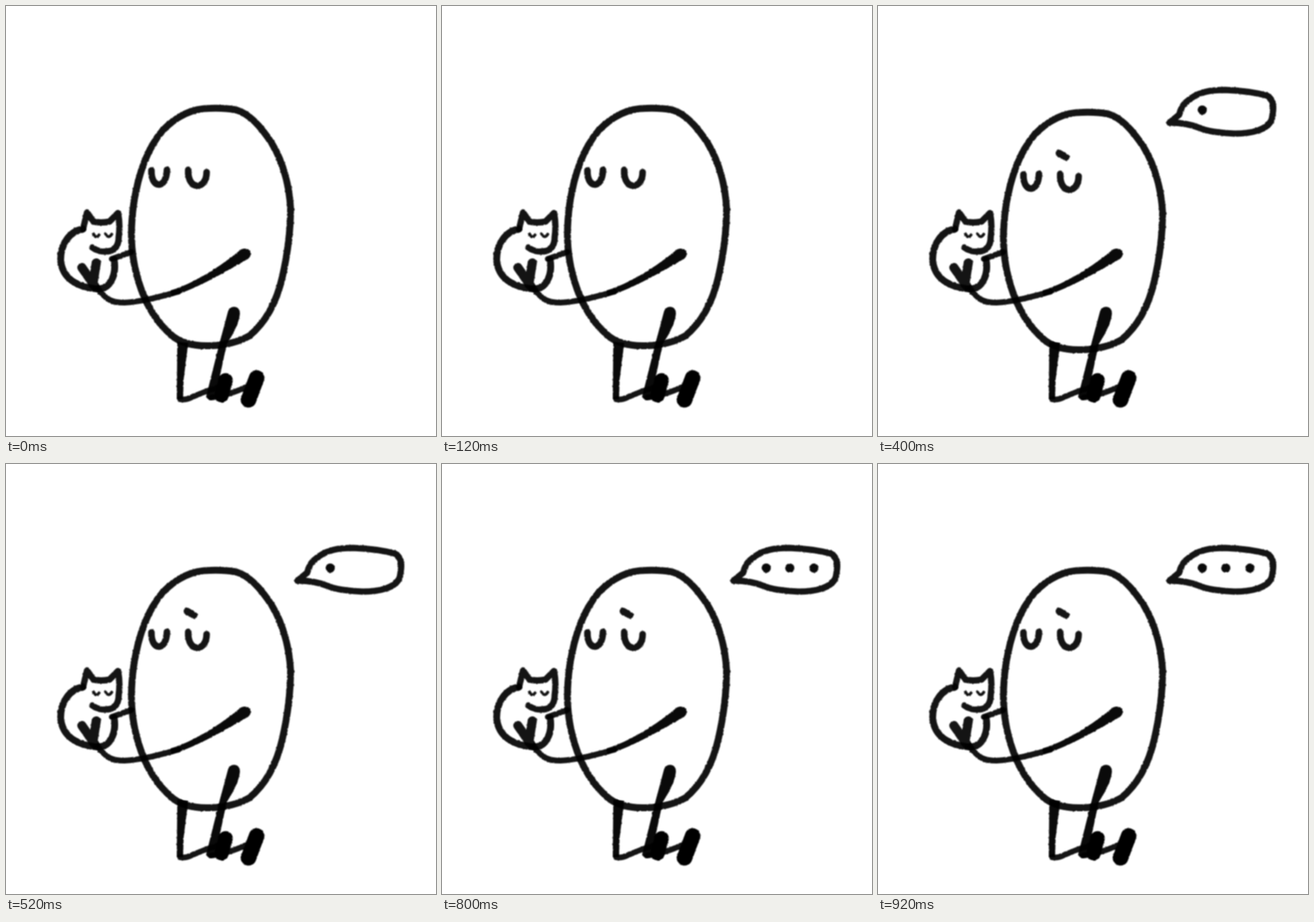
Recreate the animation shown at these times as an HTML page without scripts. Size 748 by 748 pixels, loop 1 s.

```html
<!DOCTYPE html>
<html lang="en">
<head>
<meta charset="utf-8">
<title>Sitting with a cat</title>
<style>
  html, body { margin: 0; width: 100%; height: 100%; overflow: hidden; background: #fff; }
  svg { display: block; width: 100%; height: 100%; }
  .ink { filter: url(#rough); fill: none; stroke: #000; stroke-opacity: .92; stroke-width: 12; stroke-linecap: round; stroke-linejoin: round; }
  .solid { fill: #000; fill-opacity: .96; stroke: none; }
  .foot { stroke-opacity: 1; }

  .body, .cat, .arm, .even, .odd, .talk, .dot1, .dot2, .dot3 { animation: 1s step-end infinite; }
  .body { animation-name: sink; }
  .cat  { animation-name: nudge; --dx: 4px; }
  .arm  { animation-name: nudge; --dx: 3px; }
  .odd  { animation-name: odd; }
  .even { animation-name: even; }
  .talk { animation-name: from1; }
  .dot1 { animation-name: from2; }
  .dot2 { animation-name: from3; }
  .dot3 { animation-name: from4; }

  @keyframes sink  { 0% { transform: none; } 20%, 100% { transform: translateY(7px); } }
  @keyframes nudge { 0%, 40%, 80%, 100% { transform: none; } 20%, 60% { transform: translate(var(--dx), 2px); } }
  @keyframes odd   { 0%, 40%, 80%, 100% { opacity: 0; } 20%, 60% { opacity: 1; } }
  @keyframes even  { 0%, 40%, 80%, 100% { opacity: 1; } 20%, 60% { opacity: 0; } }
  @keyframes from1 { 0% { opacity: 0; } 20%, 100% { opacity: 1; } }
  @keyframes from2 { 0% { opacity: 0; } 40%, 100% { opacity: 1; } }
  @keyframes from3 { 0% { opacity: 0; } 60%, 100% { opacity: 1; } }
  @keyframes from4 { 0% { opacity: 0; } 80%, 100% { opacity: 1; } }
</style>
</head>
<body>
<svg viewBox="0 0 748 748">
  <defs>
    <!-- crayon edge -->
    <filter id="rough" filterUnits="userSpaceOnUse" x="0" y="0" width="748" height="748" color-interpolation-filters="sRGB">
      <feTurbulence type="fractalNoise" baseFrequency=".25" numOctaves="2" seed="4" result="n"/>
      <feDisplacementMap in="SourceGraphic" in2="n" scale="2.500" xChannelSelector="R" yChannelSelector="G"/>
      <feGaussianBlur stdDeviation=".8"/>
    </filter>
  </defs>

  <g class="body"><g class="ink">
    <path d="M355 178C320 178 292 196 272 217C240 255 228 305 222 345C216 390 217 425 226 462C236 505 256 545 286 571C302 586 325 592 355 591C385 590 405 584 423 574C455 548 472 510 481 470C490 430 495 390 495 352C493 315 483 273 463 240C444 210 422 187 401 181Q380 177 355 178Z"/>
    <path stroke-width="11.500" d="M253 286C252 318 279 320 280 285M317 285C315 321 349 321 349 289"/>
  </g></g>

  <g class="even"><g class="ink">
    <path class="solid" d="M298 584L317 586L309 650L308 684L297 684Z"/>
    <path stroke-width="10" d="M303 684Q312 686 322 681L346 671L378 660M357 681Q385 678 420 662"/>
    <path class="solid" d="M386 532C389 520 407 520 407 535C405 555 391 577 384 588L364 682Q355 690 348 680L371 588Z"/>
    <path class="foot" stroke-width="25" d="M382 651L375 677"/>
    <path class="foot" stroke-width="27" d="M436 647L422 685"/>
  </g></g>

  <g class="odd"><g class="ink">
    <path class="solid" d="M295 586L314 588L305 650L304 688L292 687Z"/>
    <path stroke-width="10" d="M299 687Q308 691 320 684L346 673L378 662M355 684Q385 680 420 662"/>
    <path class="solid" d="M386 532C389 520 407 520 407 535C405 555 391 577 384 588L361 685Q352 693 345 683L371 588Z"/>
    <path class="foot" stroke-width="25" d="M381 653L373 681"/>
    <path class="foot" stroke-width="28" d="M438 646L424 683"/>
  </g></g>

  <g class="cat"><g class="ink">
    <path stroke-width="11" d="M134 388L141 359L152 375Q166 378 180 375L195 360Q199 382 196 402Q196 421 182 426Q163 430 150 420"/>
    <path stroke-width="12" d="M134 388C109 392 95 416 95 442C98 475 125 489 157 492C184 495 192 464 188 441"/>
    <path stroke-width="5" d="M152 396Q156 406 162 398M173 396Q178 406 184 397"/>
    <path stroke-width="16" d="M132 455L155 488M157 447L151 484"/>
    <path stroke-width="10" d="M184 440L218 428"/>
  </g></g>

  <g class="arm"><g class="ink">
    <path stroke-width="10" d="M160 492C176 513 186 516 206 516C240 514 270 505 300 497"/>
    <path class="solid" d="M285 495C325 484 375 452 408 424C422 417 432 431 421 440C385 460 335 491 288 505Z"/>
  </g></g>

  <g class="odd"><g class="ink">
    <path stroke-width="9" d="M508 275Q505 284 512 292Q506 304 517 312Q511 324 517 342M515 436Q505 446 515 455Q506 461 509 469"/>
  </g></g>

  <g class="talk"><g class="ink">
    <path d="M315 256L327 263"/>
    <path stroke-width="11" d="M507 203L524 189Q527 176 535 168C556 148 582 146 604 146C630 147 655 150 677 156C691 164 688 182 685 197C678 216 648 222 621 222C598 221 575 219 559 212C545 206 530 203 507 203Z"/>
    <circle class="solid dot1" cx="564" cy="181" r="8"/>
    <circle class="solid dot2" cx="605" cy="181" r="8"/>
    <circle class="solid dot3" cx="647" cy="181" r="8"/>
  </g></g>
</svg>
</body>
</html>
```
